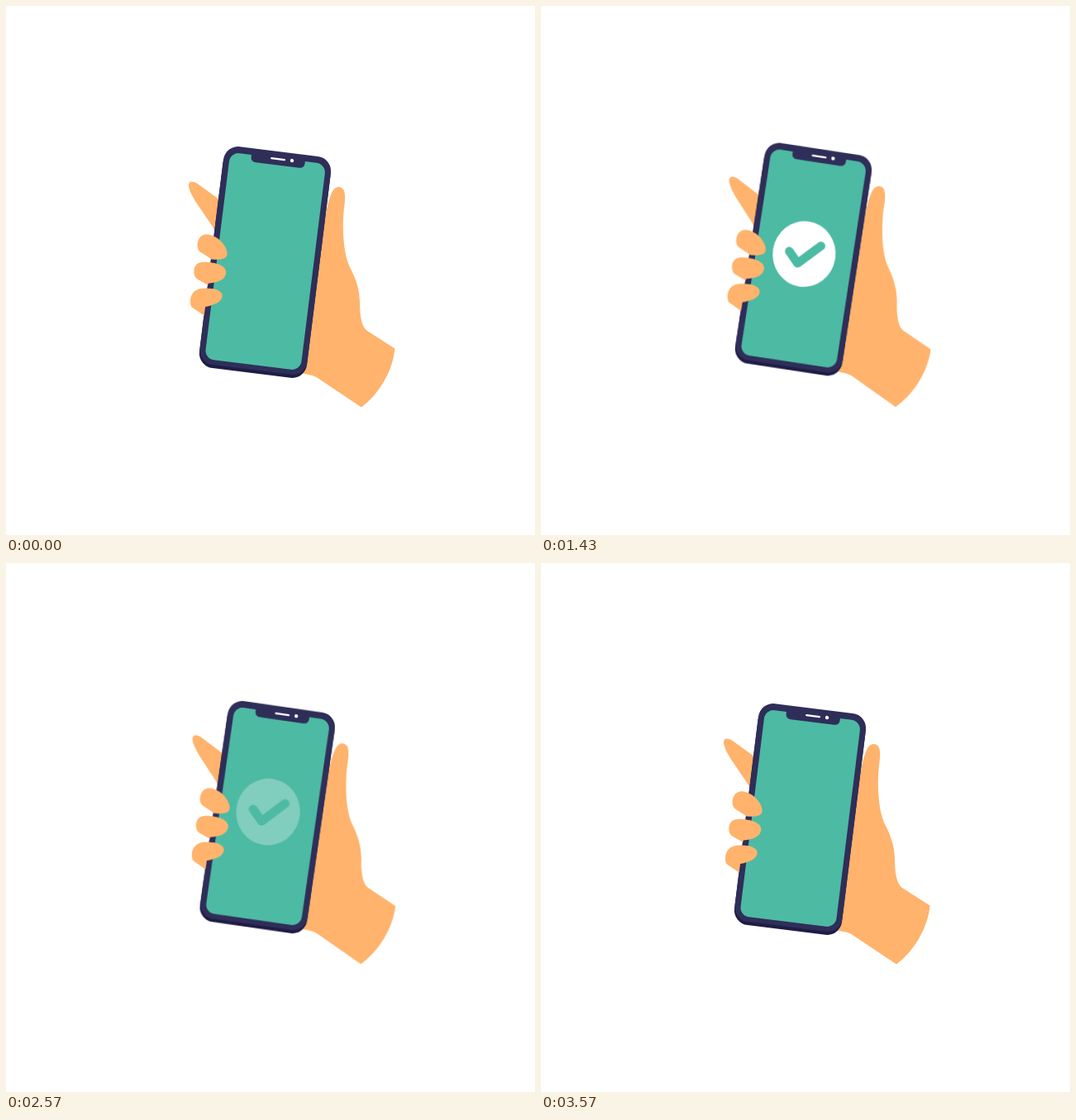
Animation of 640 by 640 pixels, one loop 3.64 s. Source, as an HTML page without scripts:

```html
<!DOCTYPE html>
<html lang="en">
<head>
<meta charset="utf-8">
<title>Hand with phone</title>
<style>
  html, body { margin: 0; width: 100%; height: 100%; overflow: hidden; background: #fff; }
  svg { display: block; width: 100%; height: 100%; }

  .skin { fill: #ffb36c; }
  .rim { fill: #1f1d45; }
  .body { fill: #2f2e59; }
  .screen { fill: #4dbaa3; }
  .light { fill: #fff; }
  .tick { fill: none; stroke: #4dbaa3; stroke-width: 11; stroke-linecap: round; stroke-linejoin: round; }

  .sway, .badge { animation: 3640ms linear -4ms infinite; }
  .sway { transform-origin: 442px 450px; animation-name: sway; }
  .badge { transform-origin: 314.2px 303.6px; animation-name: grow, fade; }

  /* 51 equal ticks per loop: 25 out, 25 back, one at rest */
  @keyframes sway {
    0% { transform: rotate(0deg); animation-timing-function: steps(25); }
    49.0196% { transform: rotate(2deg); animation-timing-function: steps(25); }
    98.0392%, 100% { transform: rotate(0deg); }
  }
  @keyframes grow {
    0%, 15.686% { transform: scale(.4); animation-timing-function: cubic-bezier(.5, 1, .89, 1); }
    49.02%, 58.82% { transform: scale(1); }
    76.47%, 100% { transform: scale(.95); }
  }
  @keyframes fade {
    0%, 15.686% { opacity: 0; animation-timing-function: ease-in-out; }
    37%, 58.82% { opacity: 1; }
    75.7%, 100% { opacity: 0; }
  }
</style>
</head>
<body>
<svg viewBox="0 0 640 640">
  <g class="sway">
    <g class="skin">
      <path d="M340 300L386 258C388 244 391 232 395 224C398 219 403 218 406 220C410 222 410.500 229 410 236C408 250 407.500 262 408 275C409 296 412 309 418 320C424 332 427.500 344 428 358C428 374 430 388 437 393L470.500 414.500C468 441 452 469 430 485.500L377 450C372 446.500 366 446 358 444.500Z"/>
      <path d="M260 235.500L231 214.500C225 211 221 212 221 217C221 222 226 232 233 242L254 273Z"/>
    </g>

    <g transform="translate(313.5 310) rotate(7.1)">
      <rect class="rim" x="-65.500" y="-131" width="131" height="266" rx="18"/>
      <rect class="body" x="-65.500" y="-135" width="131" height="266" rx="18"/>
      <rect class="screen" x="-58.300" y="-127" width="116.800" height="252" rx="11.500"/>
      <path class="body" d="M-32.500 -129H33V-125Q33 -118.500 26.500 -118.500H-26Q-32.500 -118.500 -32.500 -125Z"/>
      <rect class="light" x="-9" y="-127" width="18" height="2.200" rx="1.100"/>
      <circle class="light" cx="17.100" cy="-126" r="2.200"/>
    </g>

    <g class="badge">
      <ellipse class="light" cx="314.200" cy="303.600" rx="40" ry="41.800" transform="rotate(7.1 314.2 303.6)"/>
      <path class="tick" d="M295.300 300.500L306.200 315.500L335.400 292.800"/>
    </g>

    <g class="skin">
      <path d="M231.500 290C231.500 281 237 276 243 276.300C255 277 267 289 267.700 299C268 306 261 307.500 249 306.500Q247 306 246 304.500L235 297.500Q231.500 295 231.500 290Z"/>
      <path d="M227.300 321C227.500 313 233 309.300 240 309.700C254 310 266.300 314 266.300 322C266 331 257 334.500 245 335.500L244.200 337.500L231.500 330.500Q227.300 328 227.300 321Z"/>
      <path d="M223 357C223 347 230 341.700 240 341.500C252 341 262 344 261.700 351C261 358 252 362 241 364L239.700 374.500L225 364.500Q223 363 223 357Z"/>
    </g>
  </g>
</svg>
</body>
</html>
```
